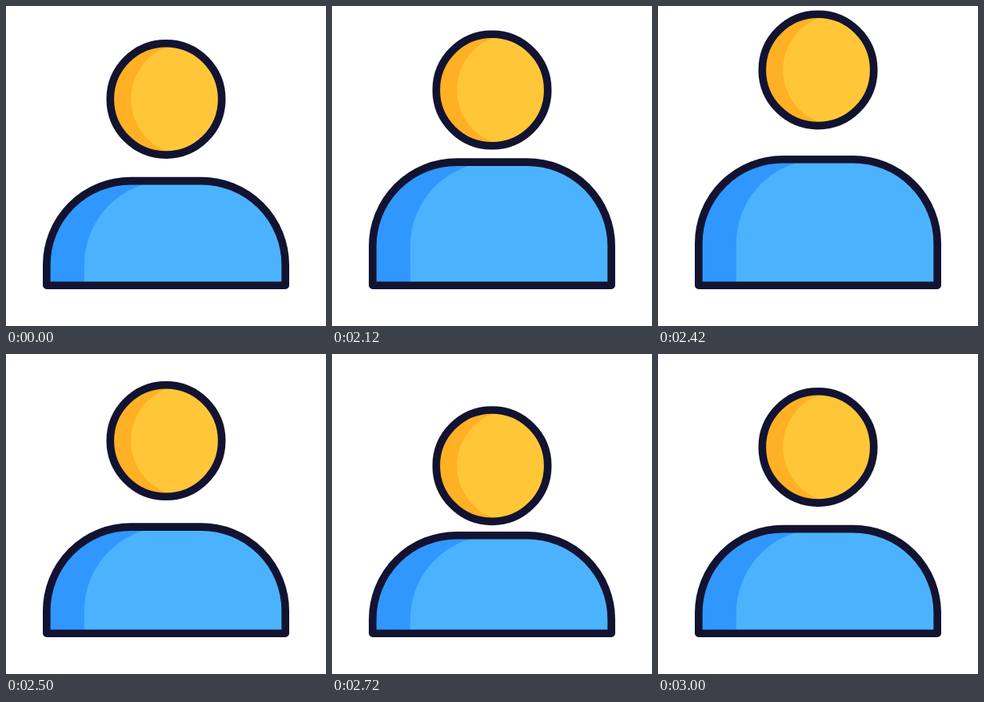
Recreate the animation shown at these times as an HTML page. Size 400 by 400 pixels, loop 3.02 s.

```html
<!DOCTYPE html>
<html lang="en">
<head>
<meta charset="utf-8">
<title>Jumping avatar</title>
<style>
  html, body { margin: 0; width: 100%; height: 100%; overflow: hidden; background: #fff; }
  svg { display: block; width: 100vw; height: 100vh; }
  .line { fill: none; stroke: #121331; stroke-width: 9.6; stroke-linejoin: round; }
  .skin { fill: #ffc738; }
  .skin-shade { fill: #ffb024; }
  .shirt { fill: #4bb3fd; }
  .shirt-shade { fill: #3097ff; }
</style>
</head>
<body>
<svg viewBox="0 0 400 400">
  <path class="shirt-shade" id="shade"/>
  <path class="shirt" id="shirt"/>
  <path class="line" id="outline"/>
  <g id="head" transform="translate(200 116.4)">
    <circle class="skin-shade" r="69.7"/>
    <path class="skin" d="M13-68.5A69.7 69.7 0 0 0 13 68.5A69.7 69.7 0 0 0 13-68.5Z"/>
    <circle class="line" r="69.7"/>
  </g>
</svg>
<script>
  const LOOP = 3020, REST = 80;
  const LEFT = 50.8, RIGHT = 349.2, BOTTOM = 349.2, RADIUS = 105, SHADE = 47;
  const [shade, shirt, outline, head] =
    ['shade', 'shirt', 'outline', 'head'].map(id => document.getElementById(id));

  const smooth = u => u * u * (3 - 2 * u);
  const cubicOut = u => 1 - (1 - u) ** 3;

  // cubic-bezier(1/3, 0, 1/3, 1)
  function quickSettle(u) {
    let lo = 0, hi = 1;
    for (let i = 0; i < 24; i++) {
      const s = (lo + hi) / 2;
      if (s - s * s + s ** 3 < u) lo = s; else hi = s;
    }
    return smooth(lo);
  }

  // Keys: [step, value, easing that leads to it]
  const headKeys = [[0, 116.4], [15, 72.4, smooth], [25, 144.6, smooth], [40, 116.4, smooth]];
  const bodyKeys = [[0, 218.6], [15, 185.2, cubicOut], [25, 228.4, quickSettle], [40, 218.6, smooth]];

  function valueAt(keys, step) {
    const i = Math.max(1, keys.findIndex(key => key[0] >= step));
    const [from, a] = keys[i - 1], [to, b, ease] = keys[i];
    return a + (b - a) * ease((step - from) / (to - from));
  }

  function bodyPath(left, top) {
    const r = RADIUS, arc = `A${r} ${r} 0 0 1`;
    return `M${left} ${BOTTOM}V${top + r}${arc} ${left + r} ${top}` +
      `H${RIGHT - r}${arc} ${RIGHT} ${top + r}V${BOTTOM}Z`;
  }

  function draw(time) {
    // 40 steps a second, on a 10 ms clock
    const tick = 2 * Math.floor(time / 50) + (time % 50 >= 20 ? 1 : 0);
    const step = Math.min(40, Math.max(0, tick - REST));
    const top = valueAt(bodyKeys, step);
    const full = bodyPath(LEFT, top);
    shade.setAttribute('d', full);
    outline.setAttribute('d', full);
    shirt.setAttribute('d', bodyPath(LEFT + SHADE, top));
    head.setAttribute('transform', `translate(200 ${valueAt(headKeys, step)})`);
  }

  const start = performance.now();
  function loop() {
    draw((performance.now() - start) % LOOP);
    requestAnimationFrame(loop);
  }
  loop();
</script>
</body>
</html>
```
